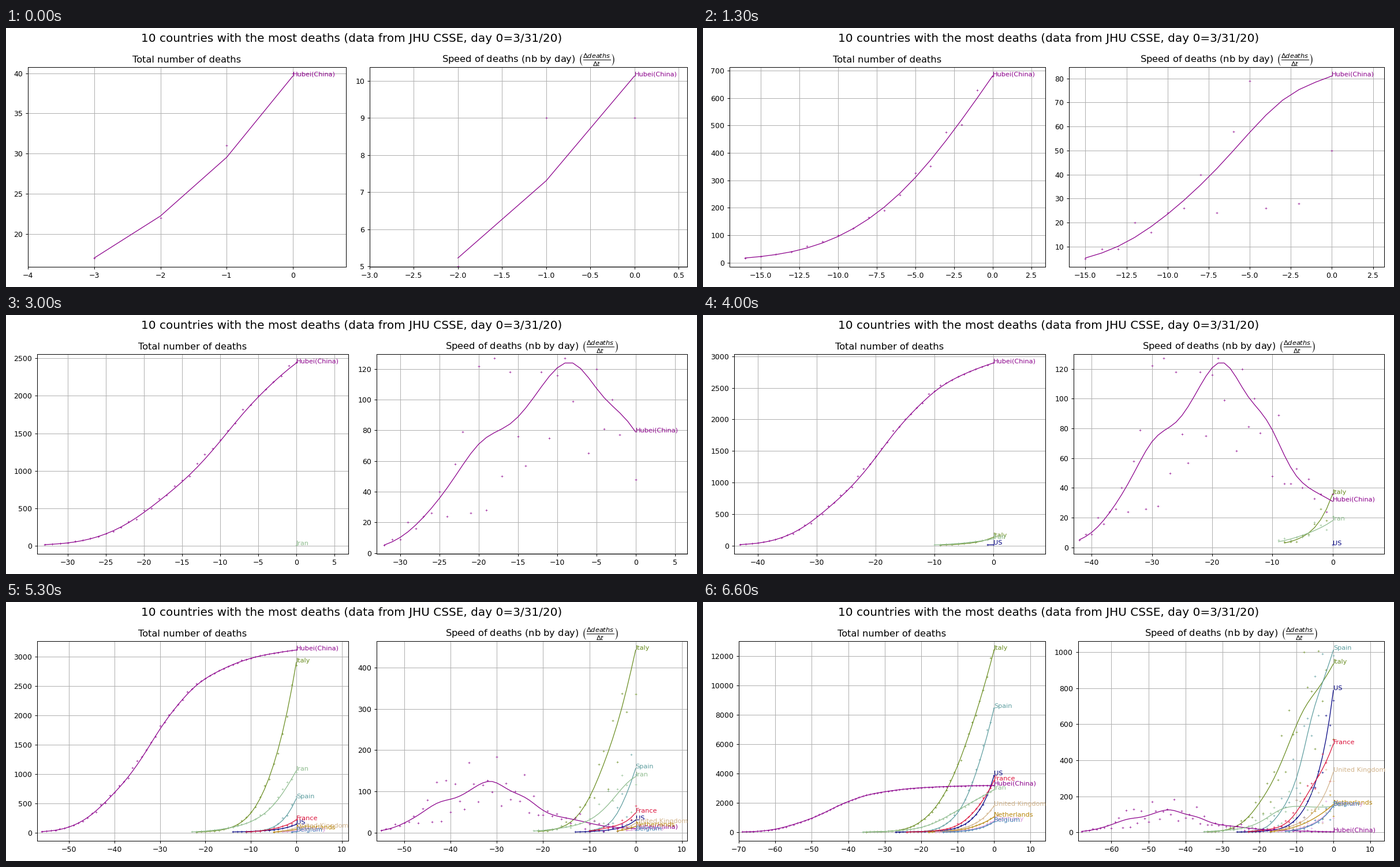
A matplotlib script that plays this animation: 1197x450 px, repeating every 9.6 s.

```python
import numpy as np
import matplotlib
import matplotlib.pyplot as plt
from matplotlib.animation import FuncAnimation

matplotlib.rcParams["font.family"] = "DejaVu Sans"

W, H, DPI = 1197, 450, 90
DAYS = 70            # 22 January to 31 March
FIRST = 4            # days visible at the start
FRAMES = 96
EM = 12.5            # tick label size in pixels
PAD = 13.5           # space around the axes
TICK = 8.75          # tick length plus label gap
EDGE = 3.05          # least margin right of an axes
BOTTOM, TOP = 34.6, 382.4

rng = np.random.default_rng(7)


def spline(keys, count):
    """Natural cubic through the logs of evenly spaced key values."""
    y = np.log(keys)
    n = len(y)
    a = 4 * np.eye(n) + np.eye(n, k=1) + np.eye(n, k=-1)
    a[[0, -1]] = np.eye(n)[[0, -1]]
    bend = np.linalg.solve(a, 6 * np.r_[0, np.diff(y, 2), 0])
    u = np.linspace(0, n - 1, count)
    i = np.minimum(u.astype(int), n - 2)
    t = u - i
    s = 1 - t
    return np.exp(s * y[i] + t * y[i + 1]
                  + ((s**3 - s) * bend[i] + (t**3 - t) * bend[i + 1]) / 6)


class Series:
    """Curve, markers and label of one country in one panel."""

    def __init__(self, ax, name, color, raw, curve):
        self.raw, self.curve = raw, curve
        self.start = DAYS - len(raw)
        self.line, = ax.plot([], [], color=color, lw=1)
        self.marks, = ax.plot([], [], "+", color=color, ms=3, mew=0.5)
        self.label = ax.text(0, 0, name, color=color, fontsize=9)

    def show(self, day):
        """Reveal the data up to a day; return the visible curve."""
        count = max(0, day - self.start + 1)
        x = np.arange(count) - count + 1
        curve = self.curve[:count]
        self.line.set_data(x, curve)
        self.marks.set_data(x, self.raw[:count])
        self.label.set_visible(count > 0)
        if count:
            self.label.set_y(curve[-1])
        return curve


fig, (left, right) = plt.subplots(1, 2, figsize=(W / DPI, H / DPI), dpi=DPI)
fig.patch.set_facecolor("white")
fig.suptitle("10 countries with the most deaths "
             "(data from JHU CSSE, day 0=3/31/20)", fontsize=16)
left.set_title("Total number of deaths", fontsize=13)
right.set_title("Speed of deaths (nb by day) "
                r"$\left(\frac{\Delta deaths}{\Delta t}\right)$", fontsize=13)

totals, speeds = [], []


def add(name, color, days, first, last, *keys):
    """Build a country from its first and last total and key daily speeds."""
    speed = spline(keys, days - 1)
    speed *= (last - first) / speed.sum()
    total = first + np.r_[0, np.cumsum(speed)]

    # Reports scatter around the curve but never fall
    raw = total + np.r_[0, speed] * rng.normal(0.2, 0.25, days)
    raw[-1] = last
    raw = np.maximum.accumulate(np.round(raw))

    totals.append(Series(left, name, color, raw, total))
    speeds.append(Series(right, name, color, np.diff(raw), speed))


add("Italy", "olivedrab", 36, 10, 12428,
    3, 10.5, 42, 128, 262, 455, 662, 795, 935)
add("Spain", "cadetblue", 25, 10, 8464,
    5, 15, 58, 150, 309, 580, 808, 1009)
add("US", "navy", 28, 11, 3873,
    1.7, 4.4, 14.5, 67, 256, 795)
add("France", "crimson", 25, 11, 3523,
    4, 10.5, 20, 46, 117, 227, 338, 490)
add("Hubei(China)", "darkmagenta", 70, 17, 3187,
    5.23, 18.3, 42.5, 71, 84.2, 108.5, 124, 101.3, 79,
    48, 35.5, 26, 16.5, 12, 9.5, 6.5, 4.6, 2.8)
add("Iran", "darkseagreen", 37, 12, 2898,
    3.8, 9.6, 21, 55, 117, 142, 138, 141)
add("United Kingdom", "tan", 18, 21, 1789,
    9, 30, 66, 152, 338)
add("Netherlands", "darkgoldenrod", 19, 10, 1039,
    4.2, 17, 45, 92, 160)
add("Germany", "plum", 17, 11, 775,
    4.5, 17, 52, 143)
add("Belgium", "steelblue", 15, 10, 705,
    5, 20, 58, 150)

for panel in (left, right):
    panel.grid(True)


def place(ax, x0, x1):
    ax.set_position([x0 / W, BOTTOM / H, (x1 - x0) / W, (TOP - BOTTOM) / H])


def text_width(s):
    return EM * sum({".": 0.318, "\u2212": 0.838}.get(c, 0.636) for c in s)


def tick_labels(axis):
    lo, hi = axis.get_view_interval()
    eps = (hi - lo) * 1e-6
    ticks = [t for t in axis.get_majorticklocs() if lo - eps <= t <= hi + eps]
    return ticks, axis.get_major_formatter().format_ticks(ticks)


def margins(ax, width):
    """Room needed left and right of an axes by its tick labels."""
    _, names = tick_labels(ax.yaxis)
    before = max(map(text_width, names)) + TICK
    ticks, names = tick_labels(ax.xaxis)
    lo, hi = ax.get_xlim()
    over = text_width(names[-1]) / 2 - (hi - ticks[-1]) / (hi - lo) * width
    return before, max(EDGE, over)


def fill(ax, group, day, span):
    shown = np.concatenate([s.show(day) for s in group])
    lo, hi = shown.min(), shown.max()
    gap = 0.05 * (hi - lo)
    ax.set_xlim(-span, span / 5)
    ax.set_ylim(lo - gap, hi + gap)


def update(i):
    count = min(FIRST + i, DAYS)
    fill(left, totals, count - 1, count)
    fill(right, speeds, count - 1, count - 1)

    place(left, 54, 592)
    place(right, 642, 1180)
    l1, r1 = margins(left, 538)
    l2, r2 = margins(right, 538)
    width = (W - 3 * PAD - l1 - r1 - l2 - r2) / 2
    place(left, PAD + l1, PAD + l1 + width)
    end = W - PAD - r2
    place(right, end - width, end)
    return []


anim = FuncAnimation(fig, update, frames=FRAMES, interval=100,
                     repeat=True, repeat_delay=0, blit=False)
plt.show()
```
